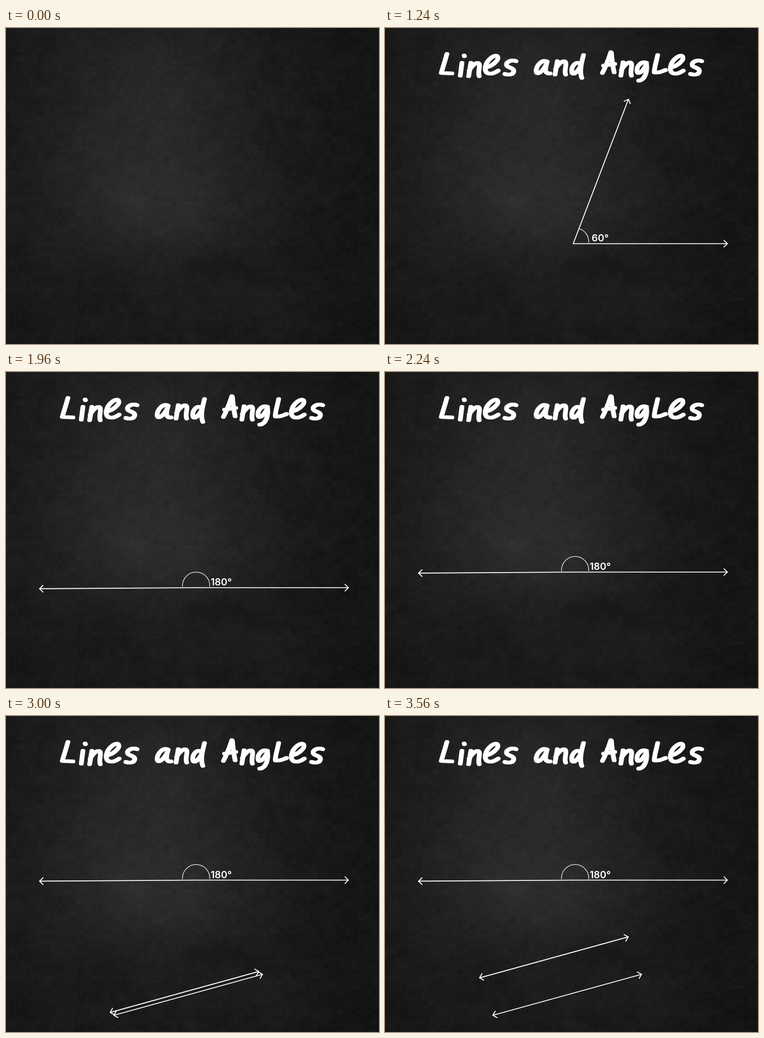
Animation of 669 by 567 pixels, one loop 4600 ms. Source, as an HTML page with a canvas:

```html
<!DOCTYPE html>
<html lang="en">
<head>
<meta charset="utf-8">
<title>Lines and Angles</title>
<style>
  html, body { margin: 0; width: 100%; height: 100%; overflow: hidden; background: #1c1c1c; }
  canvas { display: block; }
</style>
</head>
<body>
<canvas id="stage" width="669" height="567" role="img" aria-label="Lines and Angles"></canvas>
<script>
const W = 669, H = 567, LOOP = 4600, STEP = 40;
const ctx = document.getElementById('stage').getContext('2d');
const RAD = Math.PI / 180;

// Progress from 0 to 1 between two times
const ramp = (t, from, to) => Math.min(1, Math.max(0, (t - from) / (to - from)));

// ---------- chalkboard ----------
function hash(x, y) {
  let n = Math.imul(x, 374761393) + Math.imul(y, 668265263);
  n = Math.imul(n ^ (n >>> 13), 1274126177);
  return ((n ^ (n >>> 16)) >>> 0) / 4294967296;
}

function smoothNoise(x, y) {
  const ix = Math.floor(x), iy = Math.floor(y);
  const fx = x - ix, fy = y - iy;
  const u = fx * fx * (3 - 2 * fx), v = fy * fy * (3 - 2 * fy);
  const top = hash(ix, iy) * (1 - u) + hash(ix + 1, iy) * u;
  const low = hash(ix, iy + 1) * (1 - u) + hash(ix + 1, iy + 1) * u;
  return top * (1 - v) + low * v - 0.5;
}

// Soft light and dark areas: centre, radii, strength
const SPOTS = [
  [255, 220, 250, 330, 18],
  [270, 315, 170, 90, 8],
  [290, 90, 120, 130, 4],
  [375, 425, 70, 28, -5],
  [200, 455, 70, 60, -4],
  [480, 500, 70, 60, 4]
];

function makeBoard() {
  const board = document.createElement('canvas');
  board.width = W;
  board.height = H;
  const c = board.getContext('2d');
  const img = c.createImageData(W, H);
  for (let y = 0, i = 0; y < H; y++) {
    for (let x = 0; x < W; x++, i += 4) {
      let v = 20;
      for (const [cx, cy, rx, ry, power] of SPOTS) {
        v += power * Math.exp(-(((x - cx) / rx) ** 2) - ((y - cy) / ry) ** 2);
      }
      v += 4 * smoothNoise(x / 34 + 50, y / 28) + 5 * smoothNoise(x / 12, y / 9 + 70)
        + 6 * smoothNoise((x + y) / 5, (y - x) / 2.5) + 4 * smoothNoise(x / 1.5, y / 1.5);
      img.data[i] = img.data[i + 1] = img.data[i + 2] = v;
      img.data[i + 3] = 255;
    }
  }
  c.putImageData(img, 0, 0);
  return board;
}
const board = makeBoard();

// ---------- brush lettering: [path, x, y] ----------
const N = 'M6 3L2 27M3 17C9 6 18 0 21 5C23 10 18 20 21 27';
const E = 'M6 24C15 22 29 12 26 5C23 -1 7 9 4 23C2 37 14 39 27 30';
const S = 'M24 4C16 1 6 5 7 11C8 16 20 15 20 22C19 29 10 29 4 27';
const A = 'M24 5C15 0 5 11 4 21C4 31 16 24 23 8C20 18 19 27 29 26';
const LETTERS = [
  ['M14 3C11 15 7 26 4 37C10 38 16 37 23 38', 97, 45],
  ['M7 17L4 40M11 4L11.5 5', 131, 47],
  [N, 148, 61],
  [E, 176, 48],
  [S, 211, 57],
  [A, 267, 57],
  [N, 303, 58],
  ['M18 18C9 14 2 24 3 33C5 42 15 32 20 20M24 3C21 15 16 32 21 44', 332, 47],
  ['M18 3C14 15 9 29 3 40M19 4C20 15 21 26 24 39M5 27L25 24', 387, 42],
  [N, 421, 60],
  ['M21 4C11 0 3 11 4 19C6 28 16 17 21 6C23 20 18 35 7 36', 448, 60],
  ['M12 3C10 14 6 25 6 34C13 36 20 32 26 30', 477, 47],
  [E, 508, 48],
  [S, 544, 57]
];

// Each letter is laid twice, side by side, like a flat brush
const title = new Path2D();
for (const [path, x, y] of LETTERS) {
  for (const shift of [-1, 1]) {
    title.addPath(new Path2D(path), new DOMMatrix([1, 0, 0, 1, x + shift, y - 1.5]));
  }
}

function drawTitle(alpha) {
  ctx.globalAlpha = alpha;
  ctx.lineWidth = 6.6;
  ctx.stroke(title);
  ctx.globalAlpha = 1;
}

// ---------- geometry ----------
function arrowHead(x, y, angle) {
  ctx.save();
  ctx.translate(x, y);
  ctx.rotate(-angle * RAD);
  ctx.beginPath();
  ctx.moveTo(-6, -6);
  ctx.lineTo(0, 0);
  ctx.lineTo(-6, 6);
  ctx.stroke();
  ctx.restore();
}

function ray(x, y, angle, length) {
  const tx = x + length * Math.cos(angle * RAD);
  const ty = y - length * Math.sin(angle * RAD);
  ctx.beginPath();
  ctx.moveTo(x, y);
  ctx.lineTo(tx, ty);
  ctx.stroke();
  arrowHead(tx, ty, angle);
}

function drawAngle(t) {
  const angle = 180.4 * ramp(t, 798, 1952);
  const x = 337.6, y = 387 - 92.5 * ramp(t, 2060, 2655);
  ctx.globalAlpha = ramp(t, 690, 790);
  ctx.lineWidth = 1.7;
  ray(x, y, 0, 276.4);
  ray(x, y, angle, 277.3);

  if (angle > 8) {
    // The arc's centre sits a little off the vertex; stop it at the moving ray
    const ox = 3.4, oy = 3.5, r = 24.5;
    const cos = Math.cos(angle * RAD), sin = Math.sin(angle * RAD);
    const dot = cos * ox + sin * oy;
    const s = dot + Math.sqrt(dot * dot + r * r - ox * ox - oy * oy);
    const end = Math.atan2(s * sin - oy, s * cos - ox) / RAD;
    ctx.lineWidth = 1.1;
    ctx.beginPath();
    ctx.arc(x + ox, y - oy, r, 3 * RAD, -(end < -90 ? 183 : end) * RAD, true);
    ctx.stroke();
  }

  const shown = Math.floor(angle / 30) * 30;
  if (shown) ctx.fillText(shown + '°', 386, y - 3.7);
  ctx.globalAlpha = 1;
}

function doubleArrow(x1, y1, x2, y2) {
  const angle = Math.atan2(y1 - y2, x2 - x1) / RAD;
  ctx.beginPath();
  ctx.moveTo(x1, y1);
  ctx.lineTo(x2, y2);
  ctx.stroke();
  arrowHead(x2, y2, angle);
  arrowHead(x1, y1, angle + 180);
}

function drawParallels(t) {
  const gap = 71 * ramp(t, 2945, 3525);
  const dx = -4.8 - 0.268 * gap, dy = 1.3 - 0.964 * gap;
  ctx.globalAlpha = ramp(t, 2690, 2860);
  ctx.lineWidth = 1.7;
  doubleArrow(193.5, 537, 460, 463.5);
  doubleArrow(193.5 + dx, 537 + dy, 460 + dx, 463.5 + dy);
  ctx.globalAlpha = 1;
}

function draw(t) {
  ctx.drawImage(board, 0, 0);
  ctx.strokeStyle = ctx.fillStyle = '#fff';
  ctx.lineCap = ctx.lineJoin = 'round';
  ctx.font = '600 17.5px Inter, "Open Sans", sans-serif';
  ctx.textAlign = 'center';
  drawTitle(ramp(t, 60, 680));
  if (t > 690) drawAngle(t);
  if (t > 2690) drawParallels(t);
}

const start = performance.now();
function tick() {
  const t = (performance.now() - start) % LOOP;
  draw(Math.floor(t / STEP) * STEP);
  requestAnimationFrame(tick);
}
tick();
</script>
</body>
</html>
```
